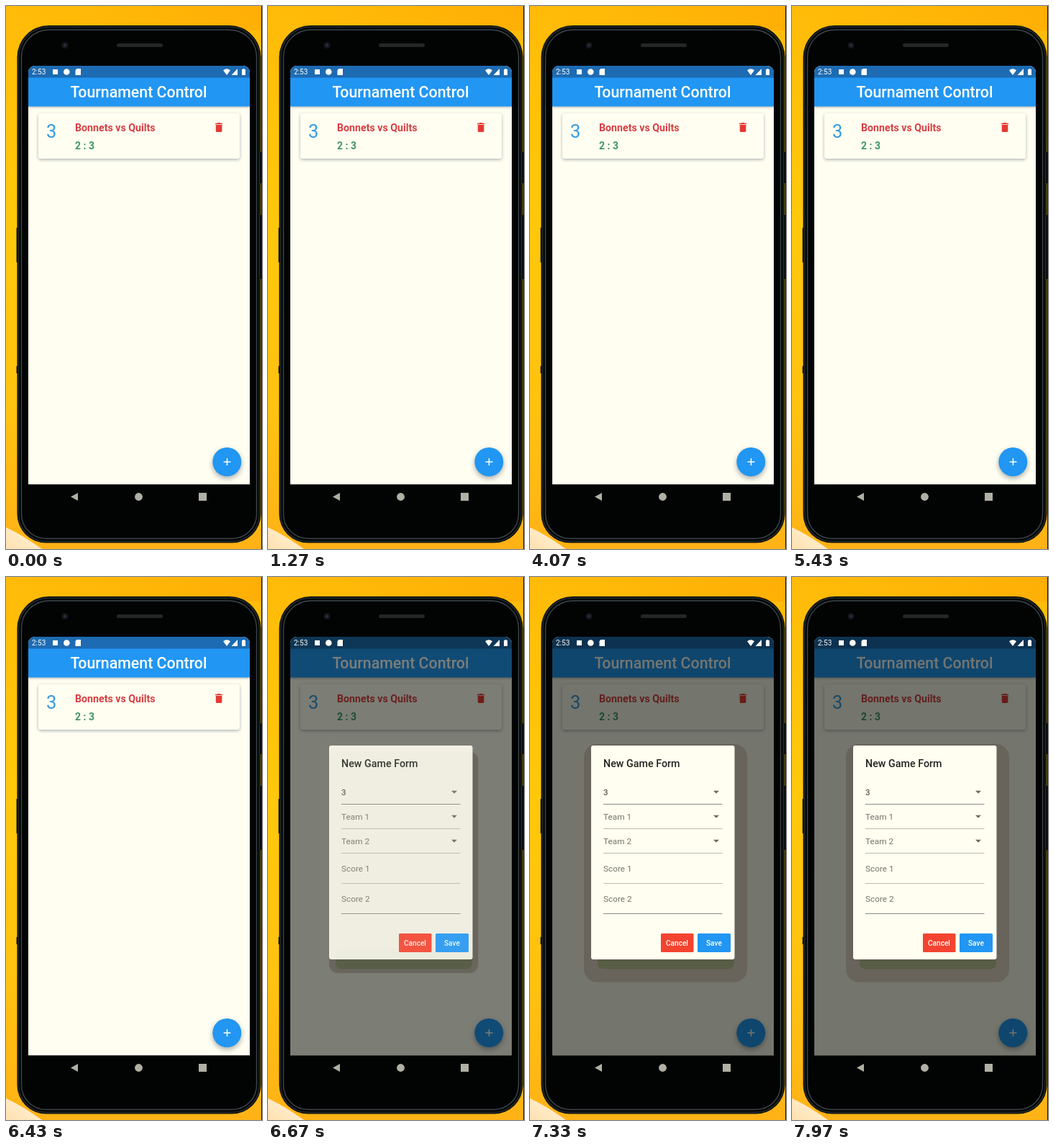
An HTML page with a canvas that plays this animation: 356x754 px, repeating every 8000 ms.

```html
<!DOCTYPE html>
<html lang="en">
<head>
<meta charset="utf-8">
<title>Tournament Control</title>
<style>
  html, body { margin: 0; width: 100%; height: 100%; overflow: hidden; background: #ffb800; }
  canvas { display: block; width: 356px; height: 754px; }
</style>
</head>
<body>
<canvas id="stage"></canvas>
<script>
const W = 356, H = 754, LOOP = 8000;
const OPEN = 6570, FADE = 150;
const PAPER = '#fffef1', BLUE = '#2196f3', RED = '#f44330';

const canvas = document.getElementById('stage');
const dpr = window.devicePixelRatio || 1;
canvas.width = W * dpr;
canvas.height = H * dpr;
const c = canvas.getContext('2d');

const clamp = v => Math.max(0, Math.min(1, v));
const lerp = (a, b, k) => a + (b - a) * k;

function rect(x, y, w, h, color) {
  c.fillStyle = color;
  c.fillRect(x, y, w, h);
}

function round(x, y, w, h, r, color) {
  c.beginPath();
  c.roundRect(x, y, w, h, r);
  c.fillStyle = color;
  c.fill();
}

function disc(x, y, r, color) {
  c.beginPath();
  c.arc(x, y, r, 0, Math.PI * 2);
  c.fillStyle = color;
  c.fill();
}

function poly(points, color) {
  c.beginPath();
  points.forEach(([x, y]) => c.lineTo(x, y));
  c.closePath();
  c.fillStyle = color;
  c.fill();
}

function text(str, x, y, size, color, weight = 400) {
  c.font = `${weight} ${size}px Roboto, sans-serif`;
  c.fillStyle = color;
  c.fillText(str, x, y);
}

function withShadow(color, blur, dy, draw) {
  c.save();
  c.shadowColor = color;
  c.shadowBlur = blur * dpr;
  c.shadowOffsetY = dy * dpr;
  draw();
  c.restore();
}

function wallpaper() {
  const g = c.createLinearGradient(0, 0, 0, H);
  g.addColorStop(0, '#ffb808');
  g.addColorStop(0.12, '#ffc008');
  g.addColorStop(0.4, '#ffc80a');
  g.addColorStop(0.75, '#ffc210');
  g.addColorStop(1, '#ffb216');
  rect(0, 0, W, H, g);
  const top = c.createLinearGradient(0, 0, W, 0);
  top.addColorStop(0, 'rgba(255,190,8,0.5)');
  top.addColorStop(1, 'rgba(255,172,4,0.8)');
  rect(0, 0, W, 34, top);

  c.beginPath();
  c.moveTo(0, 724);
  c.quadraticCurveTo(22, 734, 50, H);
  c.lineTo(0, H);
  const glow = c.createLinearGradient(26, 734, 12, H);
  glow.addColorStop(0, '#ffedcb');
  glow.addColorStop(1, '#ffe2b4');
  c.fillStyle = glow;
  c.fill();
}

function outline(inset, width, color) {
  c.beginPath();
  c.roundRect(15.5 + inset, 27 + inset, 339 - 2 * inset, 718.5 - 2 * inset,
    [44 - inset, 44 - inset, 40 - inset, 40 - inset]);
  c.strokeStyle = color;
  c.lineWidth = width;
  c.stroke();
}

function phone() {
  rect(14.5, 308, 4, 48, '#1c2022');
  rect(14.5, 500, 4, 10, '#1c2022');
  rect(353, 203, 3, 43, '#0a0c0c');
  rect(353, 290, 3, 89, '#0a0c0c');
  rect(355, 0, 1, H, '#161210');
  round(15.5, 27, 339, 718.5, [44, 44, 40, 40], '#020404');
  outline(2, 2, '#20272a');
  outline(6, 1.4, '#3c464a');
  round(154, 52, 64, 5, 2.5, '#262624');
  disc(82, 54.5, 4.5, '#14161c');
  disc(82, 54.5, 2, '#2a2c3a');
}

function trash(x, y, scale, color) {
  c.save();
  c.translate(x, y);
  c.scale(scale, scale);
  c.fillStyle = color;
  c.fill(new Path2D('M6 19c0 1.1.9 2 2 2h8c1.1 0 2-.9 2-2V7H6v12zM19 4h-3.5l-1-1h-5l-1 1H5v2h14V4z'));
  c.restore();
}

function appPage() {
  rect(31, 83, 308, 581.5, PAPER);
  withShadow('rgba(70,80,90,0.35)', 3, 1, () => rect(31, 99, 308, 40.5, BLUE));
  rect(31, 83, 308, 16.5, '#1d6bb2');
  text('Tournament Control', 89.5, 127, 21.35, '#fffffa', 500);

  withShadow('rgba(70,85,105,0.45)', 4, 1.5, () => round(45, 149, 280, 63, 3, PAPER));
  text('3', 56, 183, 25.5, '#369ae0');
  text('Bonnets vs Quilts', 96, 174, 14.2, '#d83f42', 700);
  text('2 : 3', 96, 199, 14, '#429765', 700);
  trash(287.4, 159.9, 0.72, '#e33a34');

  withShadow('rgba(60,70,80,0.45)', 7, 3, () => disc(307.3, 633, 20, BLUE));
  rect(302.5, 632.3, 10, 1.5, PAPER);
  rect(306.7, 628, 1.5, 10, PAPER);
}

function statusIcons() {
  const ink = '#fffffa';
  text('2:53', 36, 95, 10, ink);
  rect(65, 88, 7, 7, ink);
  disc(84.3, 91.5, 4.3, ink);
  poly([[98.5, 87], [104, 87], [104, 96], [96.5, 96], [96.5, 89]], ink);

  c.beginPath();
  c.moveTo(307, 96);
  c.lineTo(302, 89.3);
  c.quadraticCurveTo(307, 85.3, 312, 89.3);
  c.fillStyle = ink;
  c.fill();
  poly([[322, 87], [322, 96], [313.5, 96]], ink);
  rect(328, 88, 5, 8, ink);
  rect(329.5, 87, 2, 1, ink);
}

function navBar() {
  const ink = '#b0b0a4';
  poly([[90, 681.5], [100, 676], [100, 687]], ink);
  disc(184.5, 681.5, 5.4, ink);
  rect(268, 676, 11, 11, ink);
}

function button(label, x, y, w, tx, color) {
  round(x, y, w, 26, 1.5, color);
  text(label, tx, 512, 10.1, '#fffff5', 500);
}

function dialog(barrier, fade) {
  c.globalAlpha = barrier;
  rect(31, 83, 308, 581.5, 'rgba(0,5,0,0.545)');

  c.globalAlpha = fade;
  const spread = clamp((fade - 0.85) / 0.15);
  const left = lerp(89, 75, spread), right = lerp(288.5, 302, spread);
  const top = lerp(247, 232, spread), bottom = lerp(545, 562.5, spread);
  round(left, top, right - left, bottom - top, lerp(10, 18, spread), '#69645b');
  round(94, 515, 190, 29.5, 8, '#585d46');

  round(85, 234, 199.5, 297, 3, PAPER);
  text('New Game Form', 102, 264, 14.3, '#23231f', 500);

  text('3', 102, 302.5, 11.5, '#33332e');
  const fields = [['Team 1', 336.5], ['Team 2', 371], ['Score 1', 409], ['Score 2', 451]];
  fields.forEach(([label, y]) => text(label, 102, y, 11.8, '#757568'));

  [315, 349, 383, 425, 467].forEach((y, i) =>
    rect(102, y, 165.5, 1, i % 4 ? '#bcbcae' : '#8c8c80'));
  [298.5, 332.5, 366.5].forEach(y =>
    poly([[255, y - 1.8], [263, y - 1.8], [259, y + 2.2]], '#6a6a60'));

  button('Cancel', 182, 495, 45.5, 189, RED);
  button('Save', 233, 495, 46, 245, BLUE);
  c.globalAlpha = 1;
}

function render(t) {
  const p = clamp((t - OPEN) / FADE);
  const fade = 1 - (1 - p) ** 2;
  const barrier = 1 - (1 - p) ** 2.5;

  c.setTransform(dpr, 0, 0, dpr, 0, 0);
  wallpaper();
  phone();
  c.save();
  c.beginPath();
  c.roundRect(31, 83, 308, 581.5, [9, 9, 0, 0]);
  c.clip();
  appPage();
  if (p > 0) dialog(barrier, fade);
  c.restore();
  statusIcons();
  navBar();
}

function tick() {
  render(performance.now() % LOOP);
  requestAnimationFrame(tick);
}
tick();
</script>
</body>
</html>
```
